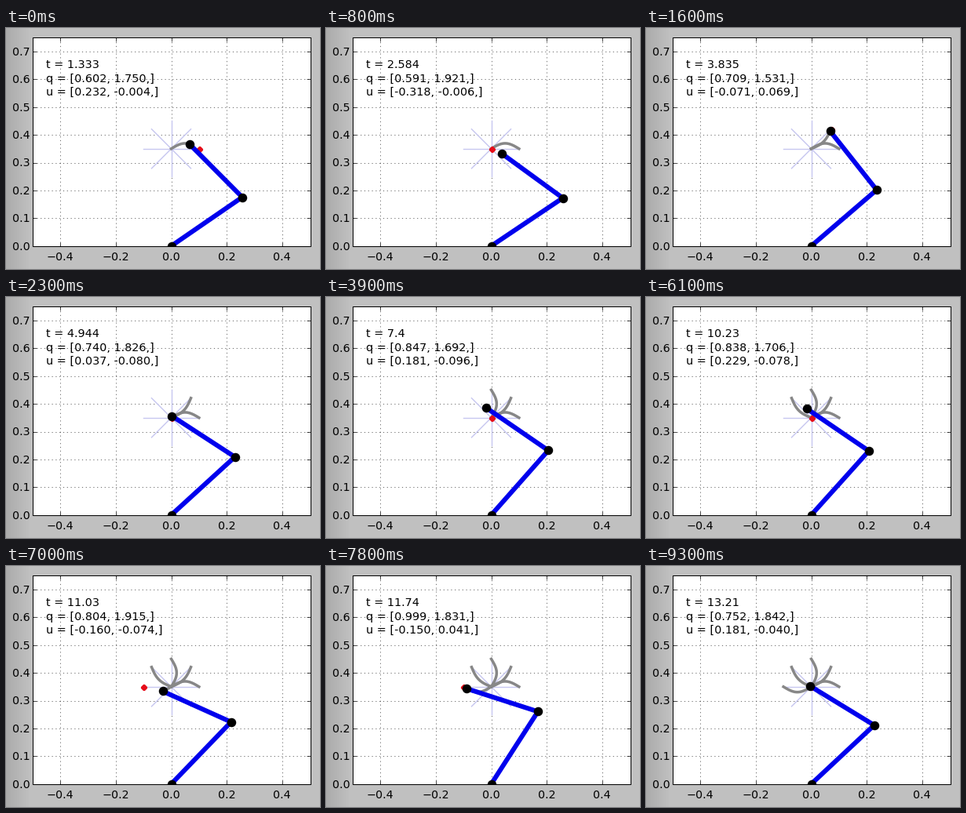
Write a matplotlib script that moves like this. It is 400 px wide and 307 px high and loops after 9.4 s.

```python
import numpy as np
import matplotlib.pyplot as plt
from matplotlib.animation import FuncAnimation

W, H, DPI = 400, 307, 64
PT = 72 / DPI              # points per pixel
FRAMES, INTERVAL = 94, 100
L1, L2 = 0.31, 0.27        # arm segment lengths
CENTER, REACH = np.array([0.0, 0.35]), 0.1
BOW, SKEW = 0.0235, 0.6    # sideways drift of the hand, by direction
LEFT, BOTTOM, UNIT = 33.5, 29.3, 354

plt.rcParams["font.family"] = "DejaVu Sans"
plt.rcParams["lines.scale_dashes"] = False

# Pacing: frame, simulation time, legs completed (even = out, odd = back)
PACE = np.array([
    (0, 1.333, 0.41), (16, 3.835, 2.735), (23, 4.944, 3.85),
    (39, 7.4, 5.6), (52, 9.4, 7.02), (61, 10.23, 7.607),
    (78, 11.74, 8.67), (93, 13.21, 9.88),
]).T


def polar(angle):
    return np.array([np.cos(angle), np.sin(angle)])


def clock(i):
    return np.interp(i, PACE[0], PACE[1])


def phase(i):
    return np.interp(i, PACE[0], PACE[2])


def is_out(legs):
    return int(legs) % 2 == 0


def direction(legs):
    return int(legs) // 2 * np.pi / 4


def target_at(legs):
    return CENTER + REACH * polar(direction(legs)) * is_out(legs)


def hand_at(legs):
    """Eased move along a ray, bowed to one side of the heading."""
    s, angle = legs % 1, direction(legs)
    bow = BOW * np.cos(2 * angle + SKEW)
    if is_out(legs):
        p = 1 - (1 - s) ** 2
        start, heading = CENTER, angle
    else:
        p = s * s * (3 - 2 * s)
        start, heading = CENTER + REACH * polar(angle), angle + np.pi
    return (start + REACH * p * polar(heading)
            + bow * np.sin(np.pi * p) * polar(heading + np.pi / 2))


def joint_angles(point):
    x, y = point
    c = (x * x + y * y - L1 ** 2 - L2 ** 2) / (2 * L1 * L2)
    q1 = np.arccos(c)
    q0 = np.arctan2(y, x) - np.arctan2(L2 * np.sin(q1), L1 + L2 * c)
    return np.array([q0, q1])


def angles(i):
    return joint_angles(hand_at(phase(i)))


def torques(i):
    """Spring towards the target, damped by the joint speed."""
    a, b = max(i - 0.1, 0), min(i + 0.1, FRAMES - 1)
    speed = (angles(b) - angles(a)) / (clock(b) - clock(a))
    error = joint_angles(target_at(phase(i))) - angles(i)
    return np.array([0.5, 0.3]) * error - np.array([0.9, 0.3]) * speed


# Hand trail, recorded only while reaching out
trail_legs = np.arange(0, 10, 0.02) + 1e-6
trail_xy = np.array([hand_at(n) if is_out(n) else (np.nan, np.nan)
                     for n in trail_legs])

fig = plt.figure(figsize=(W / DPI, H / DPI), dpi=DPI, facecolor="0.75")

# Soft shade along the left edge
back = fig.add_axes([0, 0, 1, 1], zorder=-1)
back.axis("off")
shade = 0.75 - 0.08 * np.clip(1 - np.arange(W) / 30, 0, 1)
back.imshow(shade[None, :], cmap="gray", vmin=0, vmax=1, aspect="auto")

ax = fig.add_axes([LEFT / W, BOTTOM / H, UNIT / W, 0.75 * UNIT / H])
ax.set(xlim=(-0.5, 0.5), ylim=(0, 0.75))
xticks = np.arange(-4, 5, 2) / 10
yticks = np.arange(8) / 10
ax.set_xticks(xticks)
ax.set_yticks(yticks)
ax.tick_params(direction="in", top=True, right=True, length=5 * PT,
               width=0.7 * PT, labelbottom=False, labelleft=False)
for spine in ax.spines.values():
    spine.set_linewidth(PT)

grid = dict(color="0.2", lw=0.7 * PT, ls=(0, (1.2 * PT, 3.6 * PT)), zorder=1)
for x in xticks:
    ax.axvline(x, **grid)
for y in yticks[1:]:
    ax.axhline(y, **grid)


def label(x, y, text="", size=14.2, ha="left"):
    return fig.text(x / W, 1 - y / H, text, size=size * PT, ha=ha, va="baseline")


for x in xticks:
    label(LEFT + UNIT * (x + 0.5) - 0.3, 295.6,
          f"{x:.1f}".replace("-", "\u2212"), ha="center")
for y in yticks:
    label(30.3, H - BOTTOM + 4.9 - UNIT * y, f"{y:.1f}", ha="right")

for a in np.arange(4) * np.pi / 4:
    d = REACH * polar(a)
    ax.plot(*np.array([CENTER - d, CENTER + d]).T, color=(0.78, 0.78, 0.94),
            lw=1.4 * PT, zorder=2)

trail, = ax.plot([], [], color="0.53", lw=3.5 * PT, zorder=3)
target, = ax.plot([], [], "x", color=(0.9, 0.05, 0.1), ms=5 * PT,
                  mew=5 * PT, zorder=4)
arm, = ax.plot([], [], color=(0, 0, 0.93), lw=6 * PT, zorder=5)
joints, = ax.plot([], [], "o", color="black", ms=11.5 * PT, mew=0, zorder=6)
lines = [label(50.6, 50.7 + 17.8 * n, size=14.4) for n in range(3)]


def draw(i):
    legs = phase(i)
    q, u = angles(i), torques(i)
    hand = hand_at(legs)
    pts = np.array([(0, 0), L1 * polar(q[0]), hand])
    arm.set_data(*pts.T)
    joints.set_data(*pts.T)
    target.set_data(*target_at(legs).reshape(2, 1))

    path = trail_xy[trail_legs <= legs]
    if is_out(legs):
        path = np.vstack([path, hand])
    trail.set_data(*path.T)

    lines[0].set_text(f"t = {clock(i):.4g}")
    lines[1].set_text("q = [{:.3f}, {:.3f},]".format(*q))
    lines[2].set_text("u = [{:.3f}, {:.3f},]".format(*u))
    return [target, trail, arm, joints, *lines]


anim = FuncAnimation(fig, draw, frames=FRAMES, interval=INTERVAL,
                     repeat=True, repeat_delay=0)
plt.show()
```
